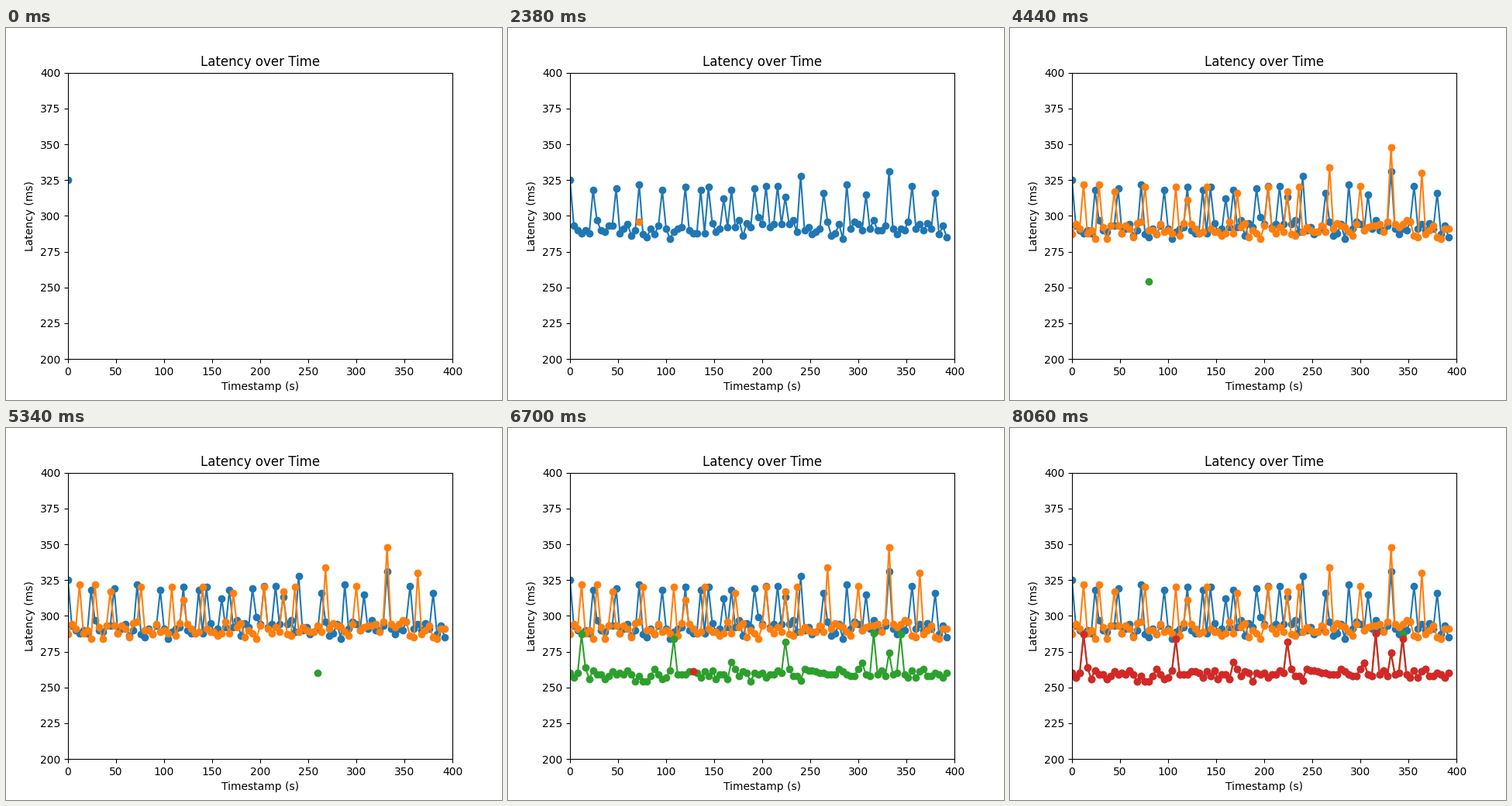
Animation of 640x480 px, one loop 8080 ms. Source, as a matplotlib script:

```python
import matplotlib.pyplot as plt
import numpy as np
from matplotlib.animation import FuncAnimation

STEP = 4            # seconds between samples
SAMPLES = 100
SLOT = SAMPLES + 1  # one frame per sample, then the joined line

rng = np.random.default_rng(7)
index = np.arange(SAMPLES)
times = STEP * index


def latency(base, spread, period=None, start=0, top=319, peaks={}):
    """Jitter around a base, with regular spikes and a few single peaks."""
    values = base + np.clip(rng.normal(0, spread, SAMPLES), -2 * spread, 2 * spread)
    if period:
        spikes = np.ceil(np.arange(start, SAMPLES - 1e-9, period)).astype(int)
        spikes = spikes[spikes < SAMPLES]
        values[spikes] = top + rng.uniform(-4, 4, len(spikes))
    for i, value in peaks.items():
        values[i] = value
    return np.round(values)


first = latency(291.5, 3.8, period=5.92,
                peaks={0: 325, 34: 318, 40: 312, 51: 321, 56: 313, 60: 328, 83: 331})
second = latency(290.5, 3.5, period=8, start=3,
                 peaks={7: 322, 30: 311, 56: 317, 67: 334, 83: 348, 91: 330})
third = latency(259.3, 2.6,
                peaks={3: 287, 27: 284, 42: 268, 56: 282, 76: 267,
                       79: 288, 83: 274, 86: 287, 99: 289})
fourth = third.copy()
fourth[[86, 99]] = 284, 313
series = [first, second, third, fourth]

fig, ax = plt.subplots(figsize=(6.4, 4.8), dpi=100)
ax.set(xlim=(0, 400), ylim=(200, 400), title="Latency over Time",
       xlabel="Timestamp (s)", ylabel="Latency (ms)")
lines = [ax.plot([], [], "o-", color=f"C{k}")[0] for k in range(len(series))]


def update(frame):
    run, i = divmod(frame, SLOT)
    for k, (line, values) in enumerate(zip(lines, series)):
        if k < run or (k == run and i == SAMPLES):
            shown = slice(0, SAMPLES - 1)
        elif k == run:
            shown = slice(i, i + 1)
        else:
            shown = slice(0, 0)
        line.set_data(times[shown], values[shown])
    return lines


anim = FuncAnimation(fig, update, frames=SLOT * len(series), interval=20,
                     repeat=True, repeat_delay=0)
plt.show()
```
